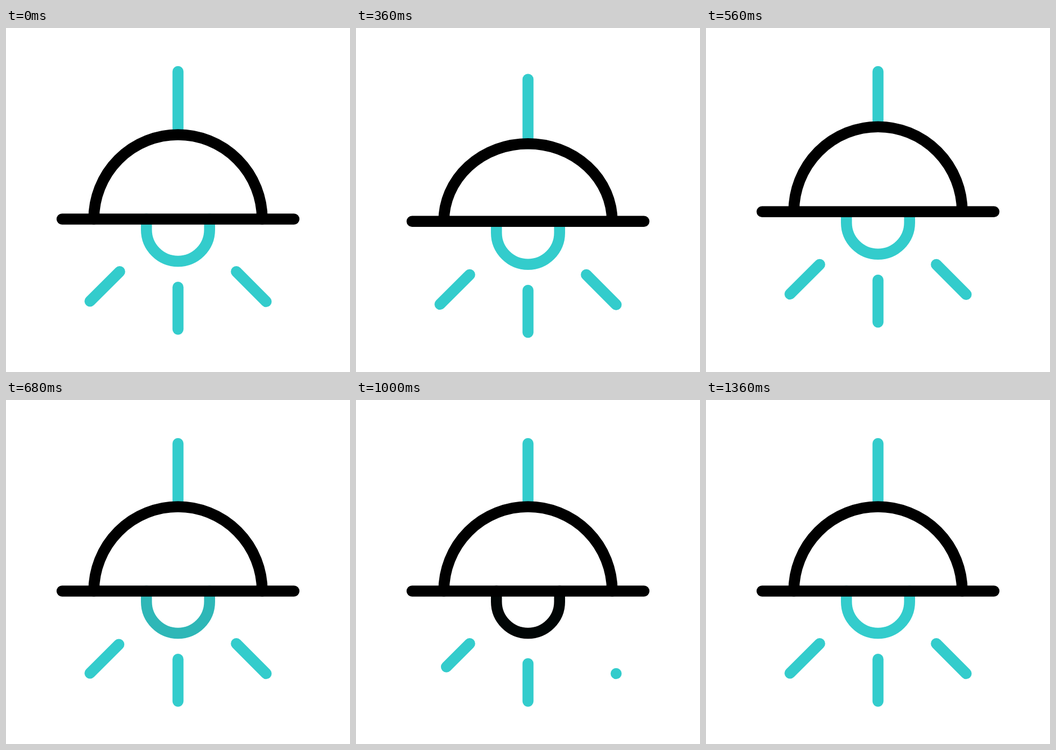
An HTML page with a canvas for the animation above (1.48 s loop, 640 by 640 pixels).

```html
<!DOCTYPE html>
<html lang="en">
<head>
<meta charset="utf-8">
<title>Pendant lamp</title>
<style>
  html, body { margin: 0; width: 100%; height: 100%; overflow: hidden; background: #fff; }
  canvas { display: block; width: 640px; height: 640px; }
</style>
</head>
<body>
<canvas id="stage" width="640" height="640"></canvas>
<script>
const ctx = document.getElementById('stage').getContext('2d');
const LOOP = 1480, STEP = 40;
const TEAL = [51, 204, 204];
const BASE_Y = 355.5;

// Keys are [time, value] pairs, eased between neighbours.
const BASE_SHIFT = [[80, 0], [173, 23.2], [547, -14.6], [640, 0]];
const LIGHT_SHIFT = [[80, 0], [173, 25.5], [547, -14.1], [640, 0]];
const CABLE_SHIFT = [[80, 0], [256, 20.5], [547, 0]];
const DOME_SQUASH = [[80, 0], [256, 17.9], [547, -1.1], [640, 0]];
const BULB_GLOW = [[640, 1], [840, 0], [960, 0], [1360, 1]];

const RAYS = [
  { from: [211.5, 453.3], to: [156.3, 508.3], start: 660 },
  { from: [428.5, 453.3], to: [484, 509], start: 804 },
  { from: [320, 482.3], to: [320, 560.5], start: 960 }
];
const RAY_TIME = 200;

const clamp = x => Math.min(1, Math.max(0, x));
const ease = x => x * x * (3 - 2 * x);
const mix = (a, b, k) => a + (b - a) * k;

function valueAt(keys, t) {
  let value = keys[0][1];
  for (let i = 1; i < keys.length; i++) {
    const [t0, v0] = keys[i - 1], [t1, v1] = keys[i];
    if (t > t0) value = mix(v0, v1, ease(clamp((t - t0) / (t1 - t0))));
  }
  return value;
}

function stroke(color, path) {
  ctx.strokeStyle = color;
  ctx.beginPath();
  path();
  ctx.stroke();
}

function line(color, x0, y0, x1, y1) {
  stroke(color, () => { ctx.moveTo(x0, y0); ctx.lineTo(x1, y1); });
}

const rgb = (color, k) => `rgb(${color.map(c => Math.round(c * k)).join(',')})`;

// Each ray leaves outward, then grows again from its inner end.
function drawRay({ from, to, start }, t, shift) {
  const out = ease(clamp((t - start) / RAY_TIME));
  const back = ease(clamp((t - start - RAY_TIME) / RAY_TIME));
  const [a, b] = out < 1 ? [out, 1] : [0, back];
  if (b - a < 0.001) return;
  const at = k => [mix(from[0], to[0], k), mix(from[1], to[1], k) + shift];
  line(rgb(TEAL, 1), ...at(a), ...at(b));
}

function draw(t) {
  ctx.fillStyle = '#fff';
  ctx.fillRect(0, 0, 640, 640);
  ctx.lineWidth = 20.5;
  ctx.lineCap = 'round';

  const baseY = BASE_Y + valueAt(BASE_SHIFT, t);
  const lightShift = valueAt(LIGHT_SHIFT, t);
  const domeHeight = 157 - valueAt(DOME_SQUASH, t);

  line(rgb(TEAL, 1), 320, 81 + valueAt(CABLE_SHIFT, t), 320, baseY - domeHeight);

  stroke(rgb(TEAL, valueAt(BULB_GLOW, t)), () => {
    ctx.moveTo(378.75, BASE_Y + lightShift);
    ctx.arc(320, 375.3 + lightShift, 58.75, 0, Math.PI);
    ctx.lineTo(261.25, BASE_Y + lightShift);
  });
  for (const ray of RAYS) drawRay(ray, t, lightShift);

  stroke('#000', () => ctx.ellipse(320, baseY, 156.6, domeHeight, 0, Math.PI, 2 * Math.PI));
  line('#000', 104.3, baseY, 535.7, baseY);
}

const begin = performance.now();
function tick() {
  const t = (performance.now() - begin) % LOOP;
  draw(Math.floor(t / STEP) * STEP);
  requestAnimationFrame(tick);
}
tick();
</script>
</body>
</html>
```
